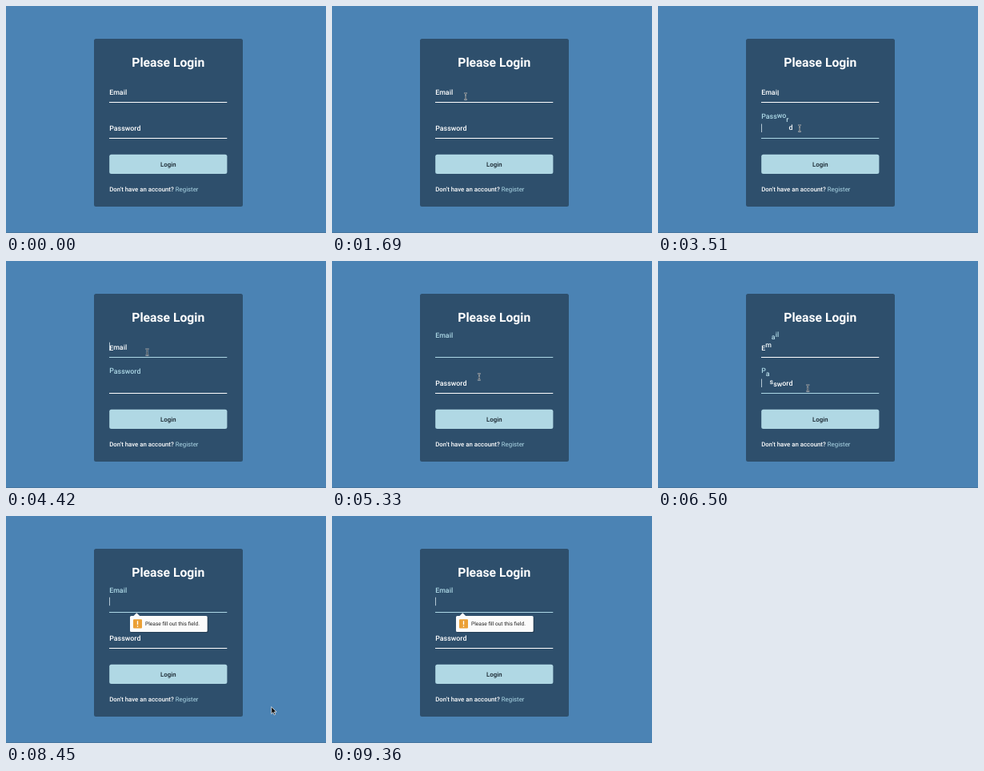
Animation, 400 px wide and 284 px high, one loop 9750 ms. Source, as an HTML page:

```html
<!DOCTYPE html>
<html lang="en">
<head>
<meta charset="utf-8">
<title>Login form with wave labels</title>
<style>
  html, body { margin: 0; width: 100%; height: 100%; overflow: hidden; background: #4b83b4; }
  svg { display: block; width: 400px; height: 284px; }
  text { font-family: Roboto, Arial, sans-serif; text-rendering: geometricPrecision; fill: #fff; }
  .label text { font-size: 8.82px; font-weight: 500; }
  .small { font-size: 7.84px; font-weight: 500; }
</style>
</head>
<body>
<svg viewBox="0 0 400 284">
  <rect width="400" height="284" fill="#4b83b4"/>
  <rect y="283" width="400" height="1" fill="#46759f"/>
  <rect x="110" y="41" width="186" height="210" rx="2.5" fill="#2e4f6c"/>

  <text x="202.8" y="76.2" text-anchor="middle" font-size="15.7" font-weight="700">Please Login</text>
  <rect id="emailLine" x="129" y="120" width="147.3" height="1"/>
  <rect id="passLine" x="129" y="165" width="147.3" height="1"/>
  <g id="email" class="label"></g>
  <g id="pass" class="label"></g>
  <rect id="caret" x="129" width="0.8" height="10.5" fill="#d5e4ee"/>

  <g id="button">
    <rect x="129.2" y="185.7" width="147.2" height="24.2" rx="2.5" fill="#b0d8e4"/>
    <text class="small" x="202.8" y="200.7" text-anchor="middle" style="fill:#14202a">Login</text>
  </g>
  <text class="small" x="129.2" y="231.7">Don't have an account?</text>
  <text class="small" x="211.8" y="231.7" style="fill:#add8e6;font-weight:400">Register</text>

  <g id="tip">
    <path d="M156 126H251.5q1.500 0 1.500 1.500V144.500q0 1.500-1.500 1.500H156z" fill="#000" opacity=".2"/>
    <path d="M156.500 125H159.500L163.300 121.200L167.100 125H250.200q1.500 0 1.500 1.500V143.500q0 1.500-1.500 1.500H156.500q-1.500 0-1.500-1.500V126.500q0-1.500 1.500-1.500z" fill="#fbfbfb"/>
    <rect x="159" y="129.200" width="11" height="11.400" rx="1" fill="#eba035"/>
    <path d="M164.500 131.300V136M164.500 137.300V138.800" stroke="#fff" stroke-width="1.300"/>
    <text x="174" y="137.400" font-size="6.620" style="fill:#222">Please fill out this field.</text>
  </g>

  <g id="cursor">
    <path id="arrow" d="M0 0V9L2.100 7.100L3.500 10.300L5 9.600L3.600 6.500H6.400z" fill="#111" stroke="#fff" stroke-width=".7"/>
    <g id="beam" fill="none">
      <path d="M-2-4Q0-4 0-3Q0-4 2-4M0-3V3M-2 4Q0 4 0 3Q0 4 2 4M-1 1H1" stroke="#fff" stroke-opacity=".75" stroke-width="1.700"/>
      <path d="M-2-4Q0-4 0-3Q0-4 2-4M0-3V3M-2 4Q0 4 0 3Q0 4 2 4M-1 1H1" stroke="#26323c" stroke-width=".7"/>
    </g>
    <path id="hand" d="M-.8 0Q0-.8.700 0V2.600Q1.700 2.200 2.200 3Q3.100 2.600 3.500 3.400Q4.700 3.200 4.700 4.400V6Q4.200 7 4 8.300H-.7Q-1.400 6.700-2.900 5.200Q-3-4.100+ -1.900 4.100L-.8 5z" fill="#fff" stroke="#222" stroke-width=".7"/>
  </g>
</svg>
<script>
const LOOP = 9750, STEP = 130, LAST = 9360;
const RISE = 14.7, WAVE = 300, STAGGER = 50;
const $ = id => document.getElementById(id);
const clamp = v => Math.max(0, Math.min(1, v));

$('hand').setAttribute('d',
  'M-.8 0Q0-.8 .7 0V2.600Q1.700 2.200 2.200 3Q3.100 2.600 3.500 3.400Q4.700 3.200 4.700 4.400V6' +
  'Q4.200 7 4 8.300H-.7Q-1.400 6.700-2.900 5.200Q-3 4-1.900 4.100L-.8 5z');

// Focus periods as [start, end]
const fields = [
  { id: 'email', word: 'Email', base: 110.6, line: 'emailLine', caretY: 101.7,
    focus: [[1800, 3050], [4352, 6283], [7231, LOOP]] },
  { id: 'pass', word: 'Password', base: 156, line: 'passLine', caretY: 147.5,
    focus: [[3050, 4352], [6283, 7136]] }
];
const press = [7136, 7231];

// Pointer stops: [time, x, y], eased in between
const path = [
  [520, 404, 262], [650, 352, 228], [1300, 166, 112], [1430, 166, 112], [1560, 167, 113],
  [2080, 167, 113], [2730, 177, 153], [3510, 177, 153], [4160, 176.5, 114],
  [4680, 176.5, 114], [5720, 187.3, 159], [6500, 187.3, 159], [7020, 187.6, 195.5],
  [7670, 187.6, 195.5], [8970, 410, 262]
];

function makeLabel(f) {
  let x = 129.2;
  f.letters = [...f.word].map(ch => {
    const el = document.createElementNS('http://www.w3.org/2000/svg', 'text');
    el.textContent = ch;
    el.setAttribute('x', x);
    $(f.id).append(el);
    x += Math.max(2.45, el.getComputedTextLength());
    return el;
  });
}

// cubic-bezier(.68, -.55, .265, 1.55)
function backEase(t) {
  if (t <= 0) return 0;
  if (t >= 1) return 1;
  const curve = (s, a, b) => 3 * (1 - s) ** 2 * s * a + 3 * (1 - s) * s * s * b + s ** 3;
  let lo = 0, hi = 1;
  for (let i = 0; i < 24; i++) {
    const mid = (lo + hi) / 2;
    if (curve(mid, .68, .265) < t) lo = mid; else hi = mid;
  }
  return curve(lo, -.55, 1.55);
}

function raised(f, i, t) {
  const local = t - i * STAGGER;
  let v = 0;
  for (const [on, off] of f.focus) {
    if (local >= on) v = backEase((local - on) / WAVE);
    if (local >= off) v = 1 - backEase((local - off) / WAVE);
  }
  return v;
}

function tint(v) {
  const k = clamp(v), mix = (a, b) => Math.round(a + (b - a) * k);
  return `rgb(${mix(255, 173)},${mix(255, 216)},${mix(255, 230)})`;
}

function pointer(t) {
  const n = path.findIndex(p => p[0] > t);
  if (n < 1) return null;
  const [t0, x0, y0] = path[n - 1], [t1, x1, y1] = path[n];
  const u = (t - t0) / (t1 - t0), k = u * u * (3 - 2 * u);
  return [x0 + (x1 - x0) * k, y0 + (y1 - y0) * k];
}

function show(id, on) { $(id).style.display = on ? '' : 'none'; }

function drawPointer(t) {
  const p = pointer(t);
  show('cursor', p);
  if (!p) return;
  const [x, y] = p;
  const within = (top, bottom) => x > 129 && x < 276 && y > top && y < bottom;
  const kind = within(96, 121) || within(141, 166) ? 'beam' : within(185, 210) ? 'hand' : 'arrow';
  for (const id of ['arrow', 'beam', 'hand']) show(id, id === kind);
  $('cursor').setAttribute('transform', `translate(${x} ${y})`);
}

function draw(t) {
  let caret = false;
  for (const f of fields) {
    f.letters.forEach((el, i) => {
      const v = raised(f, i, t);
      el.setAttribute('y', f.base - RISE * v);
      el.style.fill = tint(v);
    });
    const now = f.focus.find(([on, off]) => t >= on && t < off);
    $(f.line).setAttribute('fill', now ? '#add8e6' : '#fff');
    if (now && (t - now[0]) % 1000 < 500) {
      caret = true;
      $('caret').setAttribute('y', f.caretY);
    }
  }
  show('caret', caret);
  const down = t >= press[0] && t < press[1];
  $('button').setAttribute('transform', down ? 'translate(202.8 197.8) scale(.98) translate(-202.8 -197.8)' : '');
  $('tip').setAttribute('opacity', clamp((t - 7340) / 215));
  drawPointer(t);
}

fields.forEach(makeLabel);
const start = performance.now();
function tick() {
  const t = (performance.now() - start) % LOOP;
  draw(Math.min(LAST, Math.floor(t / STEP) * STEP));
  requestAnimationFrame(tick);
}
tick();
</script>
</body>
</html>
```
